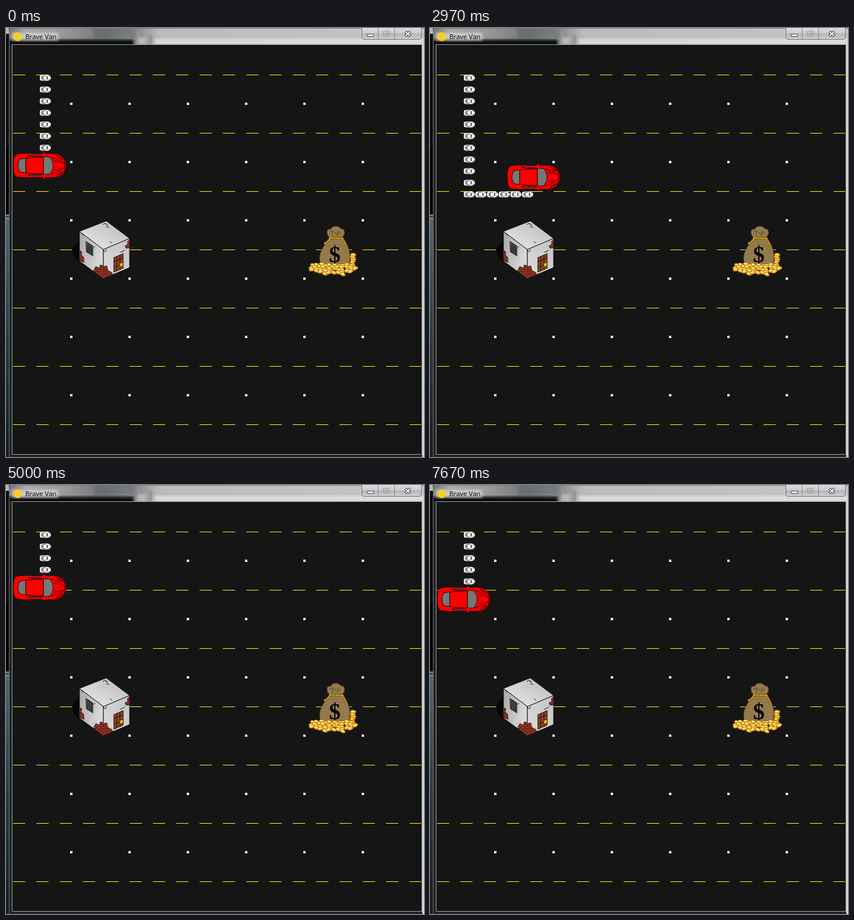
An HTML page that plays this animation: 717 by 736 pixels, repeating every 7.78 s.

```html
<!DOCTYPE html>
<html lang="en">
<head>
<meta charset="utf-8">
<title>Brave Van</title>
<style>
html, body { margin: 0; width: 100%; height: 100%; overflow: hidden; background: #151515; }
svg { display: block; width: 717px; height: 736px; }
</style>
</head>
<body>
<svg id="stage" viewBox="0 0 717 736">
<defs>
  <linearGradient id="bar">
    <stop offset="0" stop-color="#777"/><stop offset=".04" stop-color="#aaa"/>
    <stop offset=".13" stop-color="#999"/><stop offset=".22" stop-color="#75797b"/>
    <stop offset=".32" stop-color="#929495"/><stop offset=".36" stop-color="#b9bbbc"/>
    <stop offset="1" stop-color="#c3c5c6"/>
  </linearGradient>
  <linearGradient id="btn" x2="0" y2="1">
    <stop offset="0" stop-color="#dfe0e1"/><stop offset=".5" stop-color="#c8cacb"/>
    <stop offset=".52" stop-color="#b2b4b6"/><stop offset="1" stop-color="#cfd1d2"/>
  </linearGradient>
  <linearGradient id="desk" x2="0" y2="1">
    <stop offset="0" stop-color="#52666f"/><stop offset=".5" stop-color="#2a3b44"/><stop offset="1" stop-color="#121d23"/>
  </linearGradient>
  <linearGradient id="roof" y1="1" x2="1" y2="0"><stop offset="0" stop-color="#eaeaea"/><stop offset="1" stop-color="#b8b8b8"/></linearGradient>
  <linearGradient id="left" x2="1" y2=".4"><stop offset="0" stop-color="#a8a8a8"/><stop offset="1" stop-color="#dadada"/></linearGradient>
  <linearGradient id="right" y1="1" x2="1" y2="0"><stop offset="0" stop-color="#dedede"/><stop offset="1" stop-color="#c2c2c2"/></linearGradient>
  <pattern id="brick" width="7" height="6" patternUnits="userSpaceOnUse">
    <path fill="#b33a24" d="M0 0h7v6H0z"/>
    <path stroke="#3c1712" fill="none" d="M0 .5H7M0 3.5H7M2.5 0V3M6 3V6"/>
  </pattern>
  <pattern id="dash" x="12" y="80" width="40" height="100" patternUnits="userSpaceOnUse"><path fill="#ff0" d="M0 0h21v1H0z"/></pattern>
  <filter id="blur"><feGaussianBlur stdDeviation="2"/></filter>
  <clipPath id="head"><path d="M6 0H717V28H6z"/></clipPath>

  <g id="mini">
    <path fill="#fff" d="M-9-3Q-8-5-5-5H5Q10-4 10 0T5 5H-5Q-8 5-9 3z"/>
    <path fill="#666" d="M-6.500-2.500h2v5h-2zM2.500-3h2.500v6H2.500z"/>
    <path stroke="#222" stroke-width=".8" fill="none" d="M-5-3.500H1.500M-5 3.500H1.500M-3.500-3V3M6-3.500 8.500-2M6 3.500 8.500 2"/>
  </g>
  <g id="auto" stroke="#200000" stroke-linejoin="round">
    <path fill="#f00" stroke-width=".6" d="M-44.500-8Q-43.500-18-38-19.500Q-24-21.500-12-20L5-20 7-22.500 10-22.500 10-20Q26-21.500 34-18.500Q42-14 45-5V5Q42 14 34 18.500Q26 21.500 10 20L10 22.500 7 22.500 5 20-12 20Q-24 21.500-38 19.500Q-43.500 18-44.500 8Q-45 0-44.500-8z"/>
    <path fill="#777" d="M-34-10.500Q-30-12-23.500-12.500V12.500Q-30 12-34 10.500Q-40 0-34-10.500zM6.500-14.500Q12-16 18-14.500Q29 0 18 14.500Q12 16 6.500 14.500z"/>
    <path fill="#f00" d="M-23.500-12.500Q-8-15 6.500-14V14Q-8 15-23.500 12.500z"/>
    <path fill="#777" d="M-20-17H1L5-15.500-14-15zM-20 17H1L5 15.500-14 15z"/>
    <path fill="none" d="M-8-17v2M-8 17v-2M20-15 39-7M20 15 39 7M25-8 43-4M25 8 43 4M28-18Q36-16 41-9M28 18Q36 16 41 9M30-15 39-11M30 15 39 11M42-8Q45 0 42 8"/>
  </g>
</defs>

<path fill="#202224" d="M0 0H717V736H0z"/>
<g id="frame">
  <path fill="#0b0d0e" d="M0 0H5V204H0z"/>
  <path fill="#b8baba" d="M0 0H5V10H0z"/>
  <path fill="#000" d="M0 204H5V320H0z"/>
  <path fill="#84939a" d="M0 320H5V328H0z"/>
  <path fill="#3d4c54" d="M0 322H5V326H0z"/>
  <path fill="url(#desk)" d="M0 328H5V736H0z"/>
  <path fill="url(#bar)" d="M6 0H717V28H6z"/>
  <g clip-path="url(#head)">
    <path fill="#0c0c0c" filter="url(#blur)" d="M-9 20H219V40H-9z"/>
    <path fill="#ddd" opacity=".65" filter="url(#blur)" d="M10 8H90V22H10z"/>
    <path fill="#4b5558" opacity=".3" filter="url(#blur)" d="M150-5H222V17H150z"/>
    <path fill="#ddd" opacity=".5" filter="url(#blur)" d="M226 16H240V28H226z"/>
    <path fill="#777" opacity=".6" filter="url(#blur)" d="M246 10H250V28H246z"/>
    <path fill="#eee" opacity=".6" filter="url(#blur)" d="M255 18H717V28H255z"/>
    <path stroke="#888" stroke-width="4" stroke-dasharray="14 6 30 10 8 36 24 5 28 400" filter="url(#blur)" d="M271 27H717"/>
  </g>
  <path fill="#d5d8da" d="M714 28H717V736H714z"/>
  <path fill="none" stroke="#777" d="M5.500 736V6Q5.500.5 11 .5H717"/>
  <path fill="#151515" stroke="#a4a6a8" d="M10.500 28.500H713.500V731.500H10.500z"/>
  <circle cx="20" cy="15" r="7.500" fill="#f4cf28"/>
  <text x="33" y="19" font-family="'Open Sans','Noto Sans',sans-serif" font-size="11.500">Brave Van</text>
  <path fill="url(#btn)" stroke="#6d7072" d="M610.500-1H712.500V15Q712.500 19.500 708 19.500H615Q610.500 19.500 610.500 15z"/>
  <path stroke="#85888a" d="M638.500 0V19M666.500 0V19"/>
  <path fill="#fff" stroke="#444a52" d="M619.500 10.500h11v4h-11z"/>
  <path fill="none" stroke="#999" d="M647.500 5.500h10v9h-10zM650.500 8.500h4v3h-4z"/>
  <path stroke="#444a52" stroke-width="4.500" d="M685 6 693.500 14M693.500 6 685 14"/>
  <path stroke="#fff" stroke-width="2.200" d="M685.500 6.500 693 13.500M693 6.500 685.500 13.500"/>
</g>
<path fill="url(#dash)" d="M12 80H712V690H12z"/>
<g id="dots" fill="#fff"></g>

<g id="house" stroke-linejoin="round">
  <path fill="#070707" d="M126 367Q114 370 114 383Q114 397 132 404z"/>
  <path fill="url(#left)" stroke="#111" d="M126 349 167 380V430L126 400z"/>
  <path fill="url(#right)" stroke="#111" d="M167 380 212 361V411L167 430z"/>
  <path fill="url(#roof)" stroke="#111" d="M126 349 172 331 212 361 167 380z"/>
  <path fill="url(#brick)" stroke="#222" stroke-width=".8" d="M126 381 130 384 129 389 133 393 134 402 126 399zM150 417 154 409 160 412 162 406 168 409 173 408 175 416 181 419 184 423 167 430zM212 363 208 367 209 371 204 374 206 378 212 377z"/>
  <path fill="#666" stroke="#111" d="M137 366 149 374V391L138 384z"/>
  <path fill="none" stroke="#111" stroke-width="1.500" d="M140.500 369V386M143.500 371V387M146.500 373V389"/>
  <path fill="#8b4323" stroke="#111" d="M185 394 201 387V412L185 419z"/>
  <path fill="none" stroke="#2a1008" d="M190 392V417M195.500 390V414M185 401 201 394M185 411 201 404"/>
  <path fill="#efb91c" stroke="#4a3300" d="M195 404 201 402V408L195 410z"/>
  <path fill="none" stroke="#111" d="M166 337 171 335 173 339 175 337M177 342 172 341M178 366 182 369M166 381 170 384 173 380M130 352 133 356M196 385 204 381M150 377 153 374"/>
</g>

<g id="money" stroke-linejoin="round">
  <path fill="#94794c" stroke="#2c2110" stroke-width=".7" d="M555 360Q549 354 551 347Q554 344 557 345Q559 340 565 340Q570 339 574 344Q581 344 581 352Q580 357 576 360Q582 367 587 376Q594 396 586 409H542Q534 397 541 381Q549 367 555 360z"/>
  <path fill="none" stroke="#5b4726" d="M555 350Q560 347 564 351T574 350M558 347 561 357M571 347 568 357"/>
  <path fill="none" stroke="#5d4200" stroke-width="3.500" d="M555 359Q566 362 577 360Q581 368 585 375M556 360Q552 368 545 370"/>
  <path fill="none" stroke="#e5ae27" stroke-width="2.200" stroke-dasharray="3 .7" d="M555 359Q566 362 577 360Q581 368 585 375M556 360Q552 368 545 370"/>
  <text x="564" y="402" text-anchor="middle" font-family="'Liberation Serif',serif" font-weight="bold" font-size="40">$</text>
  <g id="coins" stroke="#a86400" stroke-width=".8"></g>
</g>
<g id="trail"></g>
<use id="car" href="#auto"/>
</svg>
<script>
const $ = id => document.getElementById(id);

function add(parent, tag, attrs) {
  const el = document.createElementNS("http://www.w3.org/2000/svg", tag);
  for (const key in attrs) el.setAttribute(key, attrs[key]);
  return $(parent).appendChild(el);
}

for (let i = 0; i < 36; i++)
  add("dots", "rect", { x: 110 + i % 6 * 100, y: 128 + Math.floor(i / 6) * 100, width: 4, height: 4 });

let seed = 7;
const rand = () => (seed = seed * 16807 % 2147483647) / 2147483647;

function coin(x, y) {
  const turn = `rotate(${rand() * 50 - 25} ${x} ${y})`;
  add("coins", "ellipse", { cx: x, cy: y, rx: 4.8, ry: 2.8, fill: "#f6b81c", transform: turn });
  add("coins", "ellipse", { cx: x - .5, cy: y - .8, rx: 2.8, ry: 1.2, fill: "#fff3b0", stroke: "none", transform: turn });
}

for (let y = 405; y > 388; y -= 4) coin(595 + rand() * 2 - 1, y);
for (let row = 0; row < 5; row++) {
  const half = [37, 40, 38, 31, 17][row];
  for (let x = -half; x <= half; x += 7.5) coin(561 + x + rand() * 4, 406.5 + row * 3.6 + rand() * 3 - 1.5);
}

// Route of the car: down, right, down, right, 20 px a step
const LAST = 40, LAP = LAST + 1;
function place(step) {
  const right = Math.min(Math.max(step - 10, 0), 10) + Math.max(step - 25, 0);
  const down = Math.min(step, 10) + Math.min(Math.max(step - 20, 0), 5);
  return [57.5 + 20 * right, 56 + 20 * down];
}

const trail = [];
for (let i = 0; i < LAST; i++) {
  const [x, y] = place(i);
  trail.push(add("trail", "use", { href: "#mini", x: x + 9.5, y: y + 29.5 }));
}

// Runs of picture changes: first time, last time, count, step reached
const LOOP = 7780;
const runs = [
  [70, 820, 8, 22], [860, 860, 1, 24], [1030, 1200, 3, 28], [1310, 1370, 2, 32],
  [1600, 1820, 3, 40], [1930, 2260, 4, 44], [2350, 2350, 1, 45], [2470, 2970, 6, 57],
  [3120, 3350, 4, 63], [3540, 3650, 2, 68], [3790, 4270, 5, 77], [4400, 4520, 2, 80],
  [4640, 5360, 7, 94], [5470, 6070, 6, 106], [6210, 6770, 6, 117], [6910, 7150, 3, 121],
  [7280, 7280, 1, 124], [7400, 7670, 3, 130]
];

function stepAt(t) {
  let step = 9;
  for (const [first, last, count, goal] of runs) {
    if (t < first) break;
    const gap = (last - first) / (count - 1) || 1;
    const done = Math.min(count, Math.floor((t - first) / gap + 1e-6) + 1);
    step += Math.floor((goal - step) * done / count);
  }
  return step % LAP;
}

function draw(t) {
  const step = stepAt(t);
  $("car").setAttribute("transform", `translate(${place(step)})`);
  trail.forEach((el, i) => el.style.display = i < step ? "" : "none");
}

const start = performance.now();
function tick(now) {
  draw(Math.max(0, now - start) % LOOP);
  requestAnimationFrame(tick);
}
draw(0);
requestAnimationFrame(tick);
</script>
</body>
</html>
```
